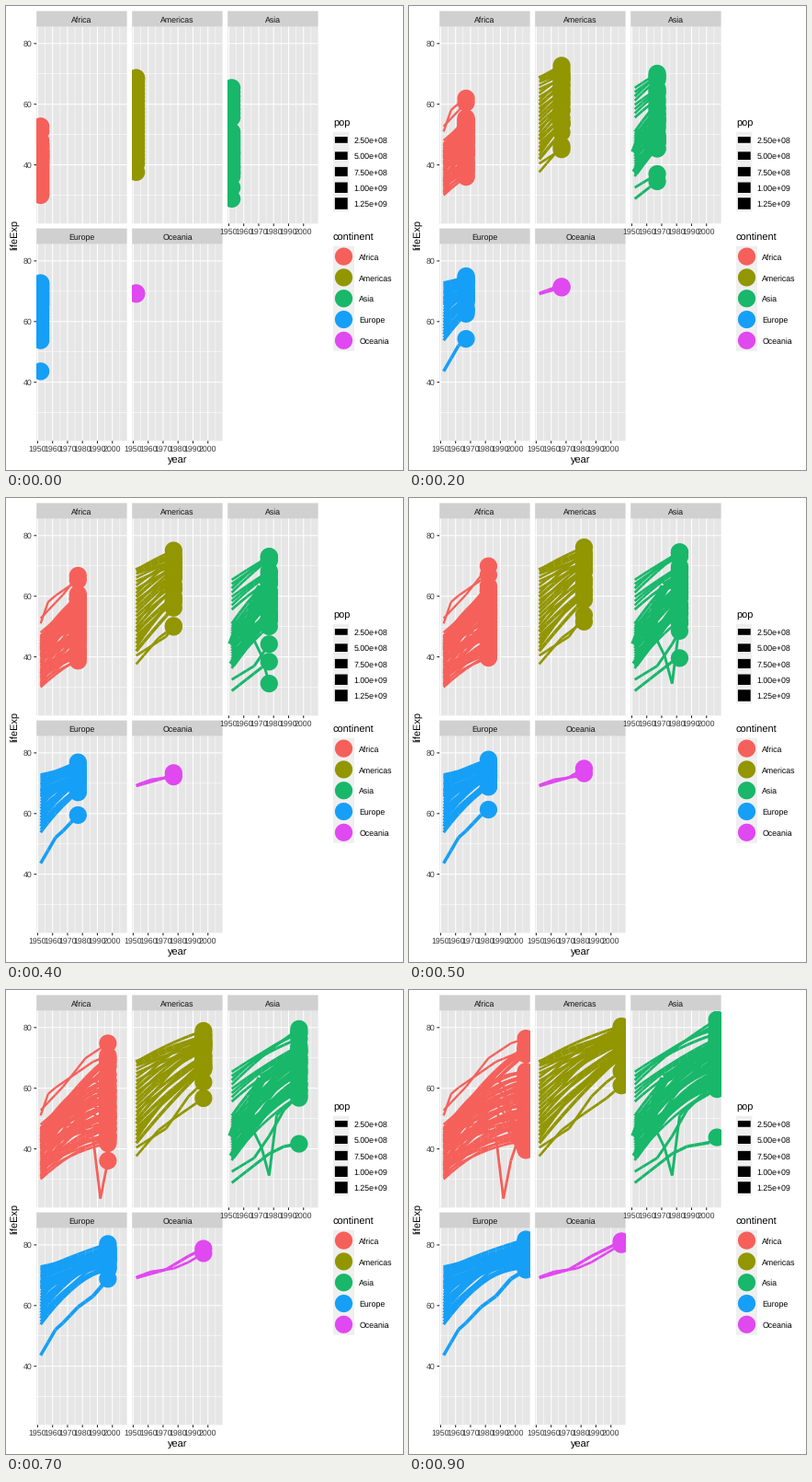
A matplotlib script for the animation above (1000 ms loop, 432 by 504 pixels).

```python
import matplotlib.pyplot as plt
import numpy as np
from matplotlib.animation import FuncAnimation
from matplotlib.collections import LineCollection
from matplotlib.patches import Rectangle

plt.rcParams["font.family"] = "Liberation Sans"
plt.rcParams["path.snap"] = False
plt.rcParams["text.hinting"] = "none"

WIDTH, HEIGHT, DPI = 432, 504, 72
PANEL_W, PANEL_H, STRIP_H = 98.4, 213.8, 17
X_SCALE, Y_SCALE = PANEL_W / 60.5, PANEL_H / 64.9
X_MIN, Y_MAX = 1949.25, 85.55
DOT_WIDTH = 19.3
YEARS = np.arange(1952, 2008, 5)
PROGRESS = np.linspace(0, 1, len(YEARS))
STEPS = 10
# Each year belongs to its nearest step; a step shows the newest year it holds.
YEAR_STEP = np.rint(PROGRESS * (STEPS - 1))


def line_width(millions):
    return 2.134 * (1 + 5 * np.sqrt(np.minimum(millions / 1318.7, 1)))


def track(values, pop, growth):
    return values, line_width(pop * growth ** PROGRESS)


def keyed(points, pop=5, growth=2.5):
    """One country passing through a few (year, value) points."""
    return track(np.interp(YEARS, *zip(*points)), pop, growth)


def trend(count, start, end, bend, pop, growth, seed, mixing=0.25):
    """Countries rising from one range to another; bend makes early gains faster."""
    rng = np.random.default_rng(seed)
    rank = np.linspace(0, 1, count)
    final_rank = rank[np.argsort(np.argsort(rank + rng.normal(0, mixing, count)))]
    first = np.interp(rank, [0, 1], start)
    last = np.interp(final_rank, [0, 1], end)
    bends = bend + rng.normal(0, 0.15, count)
    pops = pop * np.exp(np.clip(rng.normal(0, 1, count), -1.8, 1.8))
    return [track(a + (b - a) * (PROGRESS + k * PROGRESS * (1 - PROGRESS)), p, growth)
            for a, b, k, p in zip(first, last, bends, pops)]


def slumps(count):
    """Countries that climb until 1987, then fall back."""
    return [keyed([(1952, 41 + 7 * u), (1987, 52 + 11 * u), (1992, 49 + 12 * u),
                   (2002, 39.5 + 5 * u), (2007, 39.6 + 11 * u)], 2)
            for u in np.linspace(0, 1, count)]


africa = (
    trend(38, (30, 47), (42.6, 65.5), 0.85, 4, 3.3, seed=4, mixing=0.4)
    + trend(6, (41.9, 44.6), (71.2, 74), 0.3, 6, 3, seed=2)
    + slumps(5)
    + [
        keyed([(1952, 52.7), (1967, 60.5), (1982, 69.9), (1997, 74.8), (2007, 76.4)], 0.3),
        keyed([(1952, 51), (1957, 58.1), (1962, 60.2), (1987, 68.7), (2007, 72.8)], 0.5),
        keyed([(1952, 40), (1982, 46.2), (1987, 44), (1992, 23.6),
               (1997, 36.1), (2002, 43.4), (2007, 46.2)], 2.5),
    ]
)

americas = (
    trend(22, (41.9, 68.7), (69.8, 80.4), 0.35, 6, 2.3, seed=7)
    + [
        keyed([(1952, 37.6), (1967, 46.2), (1977, 49.9), (1997, 56.7), (2007, 60.9)], 3),
        keyed([(1952, 40.4), (1972, 46.7), (1987, 57.3), (1997, 62), (2007, 65.6)], 3),
        keyed([(1952, 68.4), (1977, 73.4), (2007, 78.2)], 157, 1.9),
    ]
)

asia = (
    trend(19, (36.2, 50.9), (60, 76), 0.45, 9, 2.8, seed=3, mixing=0.4)
    + trend(8, (55.6, 65.4), (71.8, 82.6), 0.4, 5, 2.5, seed=5)
    + [
        keyed([(1952, 28.8), (1977, 38.4), (1987, 40.8), (2002, 42.1), (2007, 43.8)], 8, 4),
        keyed([(1952, 32.5), (1967, 37), (1977, 44.2), (1987, 52.9), (2007, 62.7)], 5, 4),
        keyed([(1952, 39.4), (1967, 45.4), (1972, 40.3), (1977, 31.2),
               (1982, 51), (1987, 53.9), (2007, 59.7)], 5),
        keyed([(1952, 37.4), (1977, 54.2), (2007, 64.7)], 372, 3),
        keyed([(1952, 44), (1957, 50.5), (1962, 44.5), (1967, 58.4),
               (1972, 63.1), (2007, 73)], 556, 2.4),
    ]
)

europe = (
    trend(16, (65.6, 72.7), (76.4, 81.8), 0, 11, 1.2, seed=8)
    + trend(13, (53.8, 65.5), (72.5, 79), 0.8, 9, 1.2, seed=6, mixing=0.4)
    + [keyed([(1952, 43.6), (1962, 52.1), (1967, 54.3), (1977, 59.5),
              (1987, 63.1), (1997, 68.8), (2007, 71.8)], 22, 3.2)]
)

oceania = [
    keyed([(1952, 69.1), (1972, 71.9), (1987, 76.3), (2007, 81.2)], 9, 2.3),
    keyed([(1952, 69.4), (1962, 71.2), (1977, 72.2), (1987, 74.3), (2007, 80.2)], 2, 2),
]

# name, tracks, colour, column, row
CONTINENTS = [
    ("Africa", africa, "#f6605a", 0, 0),
    ("Americas", americas, "#929600", 1, 0),
    ("Asia", asia, "#18b76a", 2, 0),
    ("Europe", europe, "#169ff6", 0, 1),
    ("Oceania", oceania, "#e048f0", 1, 1),
]

fig = plt.figure(figsize=(WIDTH / DPI, HEIGHT / DPI), dpi=DPI, facecolor="white")
ax = fig.add_axes([0, 0, 1, 1])
ax.set(xlim=(0, WIDTH), ylim=(HEIGHT, 0))
ax.axis("off")


def box(x, y, w, h, color):
    return ax.add_patch(Rectangle((x, y), w, h, facecolor=color, lw=0, zorder=0))


def rule(xs, ys, color, width):
    ax.plot(xs, ys, color=color, lw=width, zorder=1, solid_capstyle="butt")


def label(x, middle, text, size=8.8, color="black", ha="left"):
    ax.text(x, middle + 0.36 * size, text, size=size, color=color, ha=ha, va="baseline")


def strokes(color, cap, zorder, **style):
    lines = LineCollection([], colors=color, capstyle=cap, zorder=zorder, **style)
    return ax.add_collection(lines, autolim=False)


def dots(color):
    """Round-capped specks, which unlike markers keep sub-pixel positions."""
    return strokes(color, "round", 4, linewidths=DOT_WIDTH)


def place_dots(collection, points):
    collection.set_segments([[(x - 0.01, y), (x + 0.01, y)] for x, y in points])


class Panel:
    def __init__(self, name, tracks, color, column, row):
        self.left = 33.2 + 104 * column
        self.top = 22.5 + 236.1 * row
        self.bottom = self.top + PANEL_H
        frame = box(self.left, self.top, PANEL_W, PANEL_H, "#e6e6e6")
        box(self.left, self.top - STRIP_H, PANEL_W, STRIP_H, "#d0d0d0")
        label(self.left + PANEL_W / 2, self.top - 7.9, name, color="#111111", ha="center")
        self.draw_grid()
        if column == 0:
            self.draw_y_axis()
        if row == 1 or column == 2:
            self.draw_x_axis()

        xs = self.x(YEARS)
        self.paths = [np.column_stack([xs, self.y(v)]) for v, _ in tracks]
        self.widths = [w for _, w in tracks]
        self.lines = strokes(color, "butt", 3)
        self.dots = dots(color)
        for artist in (self.lines, self.dots):
            artist.set_clip_path(frame)

    def x(self, year):
        return self.left + (year - X_MIN) * X_SCALE

    def y(self, value):
        return self.top + (Y_MAX - value) * Y_SCALE

    def draw_grid(self):
        for year in range(1950, 2010, 5):
            width = 0.53 if year % 10 else 1.07
            rule([self.x(year)] * 2, [self.top, self.bottom], "white", width)
        for value in range(30, 90, 10):
            width = 0.53 if value % 20 else 1.07
            rule([self.left, self.left + PANEL_W], [self.y(value)] * 2, "white", width)

    def draw_x_axis(self):
        for year in range(1950, 2010, 10):
            rule([self.x(year)] * 2, [self.bottom, self.bottom + 2.75], "#262626", 1.07)
            label(self.x(year), self.bottom + 8.2, str(year), color="#3c3c3c", ha="center")

    def draw_y_axis(self):
        for value in (40, 60, 80):
            rule([self.left - 2.75, self.left], [self.y(value)] * 2, "#262626", 1.07)
            label(self.left - 4.9, self.y(value) + 0.2, str(value), color="#3c3c3c", ha="right")

    def show(self, last):
        self.lines.set_segments([p[i:i + 2] for p in self.paths for i in range(last)])
        self.lines.set_linewidths([w[i] for w in self.widths for i in range(last)] or [1])
        place_dots(self.dots, [p[last] for p in self.paths])
        return self.lines, self.dots


def draw_legends():
    label(356, 126.6, "pop", 11)
    for i in range(5):
        middle = 145.4 + 17.28 * i
        millions = 250 * (i + 1)
        box(356, middle - 8.64, 17.28, 17.28, "#efefef")
        rule([357.9, 371.7], [middle] * 2, "black", line_width(millions))
        label(378.7, middle + 0.3, f"{millions * 1e6:.2e}")

    label(356, 250.6, "continent", 11)
    for i, (name, _, color, *_) in enumerate(CONTINENTS):
        middle = 272.1 + 22.8 * i
        box(356, middle - 11.4, 23, 22.8, "#efefef")
        place_dots(dots(color), [(367.5, middle)])
        label(384.4, middle + 0.4, name)


panels = [Panel(*continent) for continent in CONTINENTS]
draw_legends()
label(186.5, 493, "year", 11, ha="center")
ax.text(10.2, 248, "lifeExp", size=11, rotation=90, ha="center", va="center")


def update(step):
    last = np.flatnonzero(YEAR_STEP <= step)[-1]
    return [artist for panel in panels for artist in panel.show(last)]


animation = FuncAnimation(fig, update, frames=STEPS, interval=100,
                          repeat=True, repeat_delay=0, blit=False)
plt.show()
```
